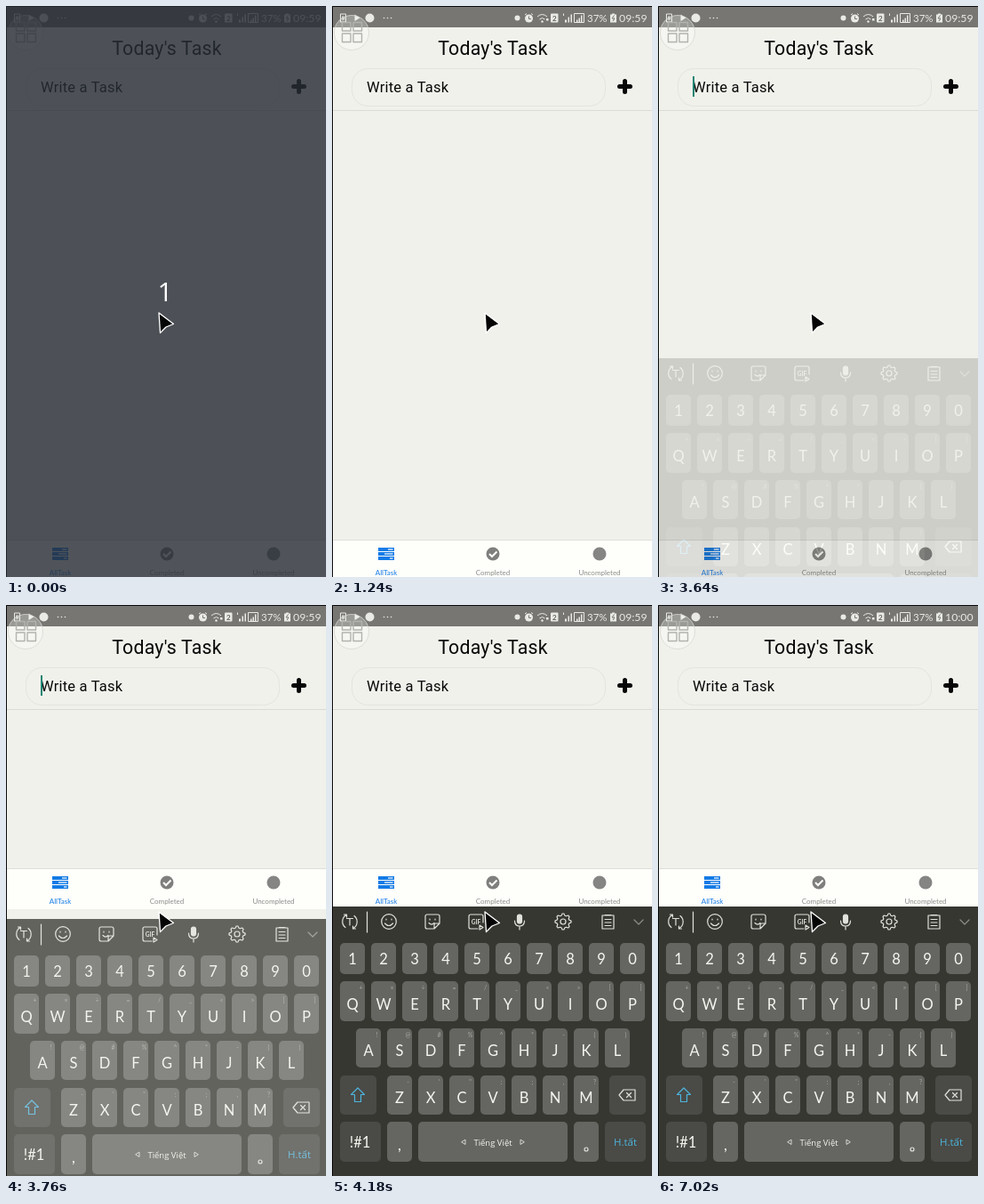
These frames come from a looping animation (360 by 642 pixels, 8 s). An HTML page:

```html
<!DOCTYPE html>
<html lang="en">
<head>
<meta charset="utf-8">
<title>Task list</title>
<style>
html, body { margin: 0; width: 100%; height: 100%; overflow: hidden; background: #f1f1ec; }
svg { display: block; width: 100vw; height: 100vh; }
text { font-family: Lato, "Open Sans", sans-serif; }
.head { font-family: Roboto, sans-serif; fill: #070707; letter-spacing: .2px; }
.wide { font-family: "Open Sans", "Noto Sans", sans-serif; }
.line { fill: none; stroke: #e2e2dd; stroke-width: 1.2; stroke-linecap: round; stroke-linejoin: round; }
.mid { text-anchor: middle; }
</style>
</head>
<body>
<svg viewBox="0 0 360 642" preserveAspectRatio="none">
  <rect width="360" height="642" fill="#f1f1ec"/>

  <!-- header -->
  <text class="head mid" x="181" y="55.3" font-size="21.3">Today's Task</text>
  <rect x="22.5" y="70.5" width="285" height="42" rx="18" fill="none" stroke="#e4e4df"/>
  <text class="head" x="39" y="97" font-size="16.5">Write a Task</text>
  <rect id="caret" x="39" y="79" width="2" height="23" fill="#1c8573"/>
  <path d="M329.5 84.5v12M323.5 90.5h12" stroke="#070707" stroke-width="5" stroke-linecap="round"/>
  <path d="M0 117.5h360" stroke="#dcdcd7"/>
  <circle id="tap" cx="211" cy="104" r="9.5" fill="#fff" fill-opacity=".5" stroke="#888" stroke-opacity=".3"/>

  <!-- status bar -->
  <rect width="360" height="24" fill="#777672"/>
  <g fill="#e9e9e5">
    <path d="M25.5 9.5l6 3.8-6 3.8z"/>
    <circle cx="42.5" cy="13.5" r="5"/>
    <circle cx="58.5" cy="13.5" r=".8"/><circle cx="62.5" cy="13.5" r=".8"/><circle cx="66.5" cy="13.5" r=".8"/>
    <circle cx="208.5" cy="13.5" r="3"/>
    <circle cx="221.5" cy="14" r="4.5"/>
    <rect x="246" y="8.5" width="8.5" height="10" rx="1"/>
    <path d="M262 18.5v-3h2v3zM265.5 18.5v-6h1.5v6zM268.5 18.5v-9h1.5v9zM275 18.5v-3h1.5v3zM277.5 18.5v-5h1.5v5zM280 18.5v-8h1.5v8z"/>
    <path d="M313 9.5h2v-1h3v1h2v9h-7z"/>
    <circle cx="236.5" cy="17.5" r="1.2"/>
    <rect id="wifi" x="241" y="14" width="2.5" height="2.5"/>
    <text x="287" y="18" font-size="11.5">37%</text>
    <text id="clock" x="323" y="18" font-size="12.3">09:59</text>
  </g>
  <g fill="none" stroke="#e9e9e5">
    <path d="M9.5 9h6v9h-6zM11.5 12h2v3h-2z"/>
    <path d="M217 10l2-1.5M226 10l-2-1.5"/>
    <path d="M231 12q5.5-5 11 0M233.500 15q3-3 6 0"/>
    <path d="M260.5 11v-2.500M272.5 8.5h11v10h-11z"/>
  </g>
  <path d="M221.5 11.500v3h2.500M317.5 10.5l-2.5 3.500h3l-2 3" fill="none" stroke="#777672"/>
  <text class="mid" x="250.3" y="16.8" font-size="8" font-weight="bold" fill="#666662">2</text>

  <!-- floating button -->
  <circle cx="22" cy="30" r="19.5" fill="#fff" fill-opacity=".25" stroke="#d9d9d4" stroke-opacity=".8"/>
  <path d="M11.5 18.5h9.5v9.5h-9.5zM24 18.5h9.5v9.5h-9.5zM11.5 31h9.5v9.5h-9.5zM24 31h9.5v9.5h-9.5z" fill="none" stroke="#b3b3ae" stroke-width="1.4" stroke-linejoin="round"/>

  <!-- tab bar -->
  <g id="tabs">
    <rect y="600" width="360" height="46" fill="#fefefb"/>
    <path d="M0 600.5h360" stroke="#deded9"/>
    <path d="M52 611h18M52 616h18M52 621h18" stroke="#147be6" stroke-width="4"/>
    <path d="M63 611h5.5M59 616h9.5M65 621h3.5" stroke="#d3e5f7" stroke-width="1.4"/>
    <circle cx="181" cy="616" r="7.5" fill="#7f7f7d"/>
    <path d="M177 616l3 3 5.5-5.5" fill="none" stroke="#fefefb" stroke-width="2"/>
    <circle cx="301" cy="616" r="7.5" fill="#858583"/>
    <g class="mid" font-size="8" fill="#8b8b89">
      <text x="61" y="640" fill="#147be6">AllTask</text>
      <text x="181" y="640">Completed</text>
      <text x="301" y="640">Uncompleted</text>
    </g>
  </g>

  <!-- keyboard -->
  <g id="board">
    <rect y="339" width="360" height="310" fill="#373732"/>
    <g class="line">
      <path d="M15 362.5a8.5 8.5 0 0 1 1-14M13.5 348h3v3M25 349.5a8.5 8.5 0 0 1-1 14M26.5 364h-3v-3M16.5 352.5h7M20 352.5v7.5"/>
      <path d="M39.5 345v23"/>
      <circle cx="64" cy="356" r="8.3"/><path d="M61 353v1M67 353v1M59.5 358q4.5 5 9 0"/>
      <path d="M107 348h12q2 0 2 2v8l-6 6h-8q-2 0-2-2v-12q0-2 2-2zM121 358h-4q-2 0-2 2v4M110 353v1M116 353v1M109 357.5q3 3 6 0"/>
      <path d="M164 364h-8q-2 0-2-2v-12q0-2 2-2h12q2 0 2 2v7M166 360l4 2.5-4 2.5z"/>
      <rect x="208.5" y="348" width="5" height="10" rx="2.5" fill="#e2e2dd"/>
      <path d="M205.5 355q0 6 5.5 6t5.5-6M211 361v4"/>
      <circle cx="260" cy="356" r="3"/>
      <path id="gear"/>
      <path d="M304 349h13v15h-13zM307 348.5h7M307 353.5h7M307 357h7M307 360.5h7"/>
      <path d="M340 354l5 5 5-5" stroke="#8d8d88"/>
    </g>
    <text class="mid" x="162" y="358.5" font-size="6.5" font-weight="bold" fill="#e2e2dd">GIF</text>
    <g id="keys"></g>
    <path class="line" d="M29 543l7.5 7.5h-4v8h-7v-8h-4z" style="stroke:#4db4dc"/>
    <path class="line" d="M323 551l5-6h13v12h-13zM331.5 548.5l5 5M336.5 548.5l-5 5"/>
    <path class="line" d="M150 601.5v5l-4-2.5zM212 601.5v5l4-2.5z" style="stroke-width:.9"/>
    <circle class="line" cx="286" cy="612" r="2"/>
  </g>

  <path d="M.5 642V.5H360" fill="none" stroke="#0b0b0b"/>
  <g id="shade">
    <rect width="360" height="642" fill="rgb(40,45,54)" fill-opacity=".81"/>
    <text class="mid wide" x="179" y="332" font-size="30" fill="#fff">1</text>
  </g>
  <path d="M173 347l14 10.5-8 3-5 5.500z" fill="#050505" stroke="#050505" stroke-linejoin="round"/>
  <path d="M172 345l16.500 12.5-8.500 3.500-6.500 6.500z" fill="none" stroke="#fff" stroke-width="1.3" stroke-linejoin="round"/>
</svg>
<script>
const LOOP = 8000;
const DARK = '#4a4a46';
const $ = id => document.getElementById(id);

const box = (x, y, w, h, fill = '#656561') =>
  `<rect x="${x}" y="${y}" width="${w}" height="${h}" rx="5" fill="${fill}"/>`;
const label = (s, x, y, size, fill = '#f6f6f1', font = '') =>
  `<text class="mid ${font}" x="${x}" y="${y}" font-size="${size}" fill="${fill}">${s.replace('&', '&amp;').replace('<', '&lt;')}</text>`;

// One row of letter keys, each with an optional small mark in its corner
function row(chars, marks, x, y, h, base) {
  return [...chars].map((c, i) => {
    const cx = x + 35 * i;
    return box(cx - 14, y, 28, h) + label(c, cx, base, 16.5) +
      label(marks[i] || '', cx + 9.5, y + 9.5, 7, '#a9a9a4');
  }).join('');
}

$('keys').innerHTML =
  row('1234567890', '', 23, 380, 35, 403.5) +
  row('QWERTYUIOP', '+×÷=/_<>[]', 23, 423, 45, 454.5) +
  row('ASDFGHJKL', '!@#%^*-()', 41, 476, 44, 507) +
  row('ZXCVBNM', '-\'":;,?', 76, 529, 44, 559.5) +
  box(9, 529, 41, 44, DARK) + box(312, 529, 41, 44, DARK) +
  box(9, 581, 46, 45, DARK) + box(62, 581, 28, 45) + box(97, 581, 168, 45) +
  box(272, 581, 28, 45) + box(307, 581, 46, 45, DARK) +
  label('!#1', 31.5, 609.5, 16.5) + label(',', 76, 613, 17) +
  label('Tiếng Việt', 181, 607.5, 9.5, '#f6f6f1', 'wide') +
  label('H.tất', 330, 608, 11.5, '#4db4dc', 'wide');

// Eight-toothed gear outline
$('gear').setAttribute('d', 'M' + Array.from({ length: 32 }, (_, i) => {
  const a = (i - .5) * Math.PI / 16, r = i % 4 < 2 ? 9 : 7;
  return (260 + r * Math.cos(a)).toFixed(1) + ' ' + (356 + r * Math.sin(a)).toFixed(1);
}).join('L') + 'Z');

// Keyboard entrance: [start, offset, opacity]
const ENTER = [[0, 57, 0], [3640, 57, .18], [3760, 14, .76], [3800, 4, 1], [3900, 0, 1]];

function tapOpacity(t) {
  if (t < 2400 || t >= 3060) return 0;
  if (t < 2540) return .8;
  if (t < 2680) return 1;
  return .8 - .2 * Math.floor((t - 2680) / 95);
}

function draw(t) {
  const show = (id, on) => $(id).setAttribute('visibility', on ? 'visible' : 'hidden');
  show('shade', t < 20);
  show('wifi', t >= 1240);
  show('caret', t >= 2780 && t < 4180 || t >= 5580 && t < 7020);
  $('tap').setAttribute('opacity', tapOpacity(t));
  $('clock').textContent = t < 6140 ? '09:59' : '10:00';
  $('tabs').setAttribute('transform', `translate(0 ${t < 3760 ? 0 : -304})`);
  const [, dy, alpha] = ENTER.findLast(k => t >= k[0]);
  $('board').setAttribute('transform', `translate(0 ${dy})`);
  $('board').setAttribute('opacity', alpha);
}

let start;
function tick(now) {
  start ??= now;
  draw((now - start) % LOOP);
  requestAnimationFrame(tick);
}
draw(0);
requestAnimationFrame(tick);
</script>
</body>
</html>
```
